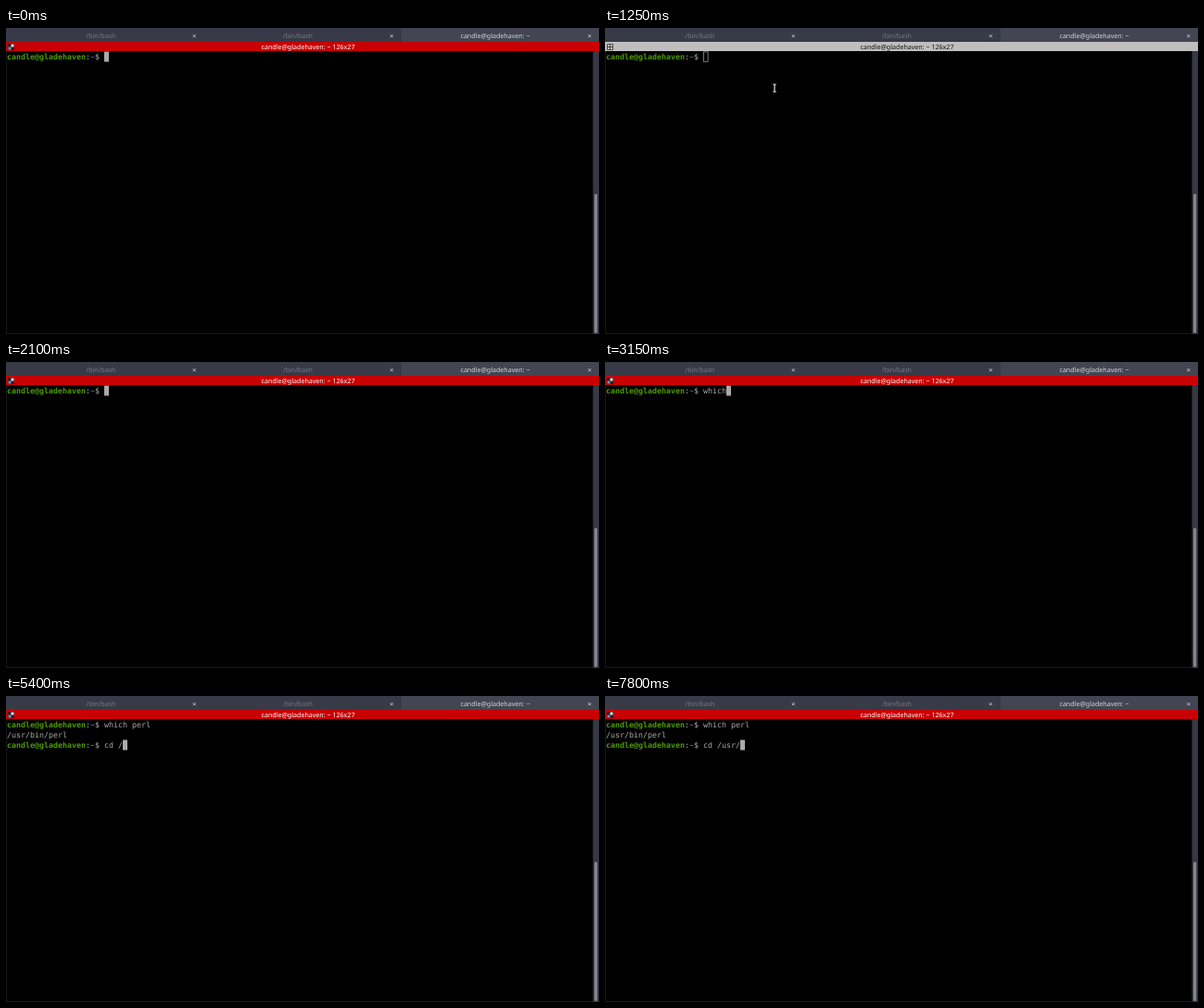
Recreate the animation shown at these times as an HTML page. Size 640x331 px, loop 8000 ms.

```html
<!DOCTYPE html>
<html lang="en">
<head>
<meta charset="utf-8">
<title>Terminal</title>
<style>
  html, body { margin: 0; width: 100%; height: 100%; overflow: hidden; background: #000; }
  svg { display: block; width: 640px; height: 331px; }
  text { text-rendering: geometricPrecision; white-space: pre; }
  .ui { font: 7.1px "Noto Sans", sans-serif; text-anchor: middle; fill: #d3d6dc; }
  .dim { fill: #777985; }
  .term { font: 8.305px "DejaVu Sans Mono", monospace; fill: #aaa; }
  .user { font-weight: bold; fill: #4e9a06; }
  .path { font-weight: bold; fill: #3f6496; }
  .close { stroke: #c9ccd3; stroke-width: .9; }
</style>
</head>
<body>
<svg viewBox="0 0 640 331">
  <rect width="640" height="331"/>

  <rect width="640" height="15.5" fill="#383a48"/>
  <rect x="427" width="213" height="15.5" fill="#434553"/>
  <text class="ui dim" x="102.5" y="11">/bin/bash</text>
  <text class="ui dim" x="315" y="11">/bin/bash</text>
  <text class="ui" x="528" y="11">candle@gladehaven: ~</text>
  <path class="close" d="M201.8 7.2l3 3m0-3l-3 3M414.8 7.2l3 3m0-3l-3 3M628.3 7.2l3 3m0-3l-3 3"/>

  <rect id="bar" y="15" width="640" height="10"/>
  <text id="title" class="ui" x="326" y="23">candle@gladehaven: ~ 126x27</text>
  <g id="iconOn">
    <rect x="2" y="17" width="7" height="7" fill="#391a24"/>
    <rect x="5.5" y="17.5" width="3" height="3" fill="#ddd"/>
    <rect x="2.5" y="20.5" width="3" height="3" fill="#6796b8"/>
  </g>
  <path id="iconOff" d="M2.5 17.5h6v6h-6zM5.5 17.5v6M2.5 20.5h6" fill="none" stroke="#333" stroke-width=".8"/>

  <rect x="633.5" y="25" width="6.5" height="306" fill="#363846"/>
  <rect x="635" y="179.5" width="3.2" height="150.5" rx="1.4" fill="#83858e"/>
  <path d="M.25 25V330.7H634" fill="none" stroke="#343540" stroke-width=".6"/>

  <g class="term">
    <text x="1" y="33.7"><tspan class="user">candle@gladehaven</tspan>:<tspan class="path">~</tspan>$ <tspan id="line1"></tspan></text>
    <g id="reply">
      <text x="1" y="44.7">/usr/bin/perl</text>
      <text x="1" y="55.7"><tspan class="user">candle@gladehaven</tspan>:<tspan class="path">~</tspan>$ <tspan id="line2"></tspan></text>
    </g>
  </g>
  <rect id="caret" width="5" height="11" fill="#aaa"/>
  <rect id="hollow" x="106.4" y="25.9" width="4.7" height="10.4" fill="none" stroke="#aaa" stroke-width=".7"/>
  <path id="mouse" d="M-1.8 -4h3.6M0 -4V4M-1.8 4h3.6" fill="none" stroke="#e4e4e4" stroke-width="1.2"/>
</svg>
<script>
  const LOOP = 8000, CELL = 5, ENTER = 4050;
  const $ = id => document.getElementById(id);
  const show = (id, on) => $(id).setAttribute('visibility', on ? 'visible' : 'hidden');
  const within = (t, a, b) => t >= a && t < b;
  const mix = (a, b, k) => a + (b - a) * k;

  // Time at which each character is echoed
  const first = { text: 'which perl', at: [2250, 2400, 2500, 2550, 3100, 3400, 3550, 3600, 3700, 3850] };
  const second = { text: 'cd /usr/', at: [4650, 4650, 4850, 5400, 6200, 6300, 6450, 7800] };
  const blinks = [[1950, 2100], [3000, 3100], [5850, 6150], [6900, 7500]];
  const path = [[550, 517, 14], [850, 190, 53], [1050, 190, 53], [1250, 183, 65], [2050, 183, 65]];

  const typed = (cmd, t) => cmd.text.slice(0, cmd.at.filter(a => a <= t).length);

  function mouseAt(t) {
    const i = path.findIndex(p => p[0] > t);
    if (i < 1) return null;
    const [t0, x0, y0] = path[i - 1], [t1, x1, y1] = path[i];
    const k = (t - t0) / (t1 - t0), e = k * k * (3 - 2 * k);
    return [mix(x0, x1, e), mix(y0, y1, e)];
  }

  function render(now) {
    const t = Math.floor(now % LOOP / 50) * 50;
    const focused = !within(t, 50, 1350);
    const one = typed(first, t), two = typed(second, t), done = t >= ENTER;

    $('bar').setAttribute('fill', focused ? '#c80003' : '#c0bebf');
    $('title').style.fill = focused ? '#fff' : '#111';
    show('iconOn', focused);
    show('iconOff', !focused);

    $('line1').textContent = one;
    $('line2').textContent = two;
    show('reply', done);

    $('caret').setAttribute('x', 106 + CELL * (done ? two : one).length);
    $('caret').setAttribute('y', done ? 47.5 : 25.5);
    show('caret', focused && !blinks.some(([a, b]) => within(t, a, b)));
    show('hollow', !focused);

    const pos = mouseAt(t);
    show('mouse', pos);
    if (pos) $('mouse').setAttribute('transform', `translate(${pos})`);
  }

  let start;
  function tick(now) {
    start ??= now;
    render(now - start);
    requestAnimationFrame(tick);
  }
  render(0);
  requestAnimationFrame(tick);
</script>
</body>
</html>
```
